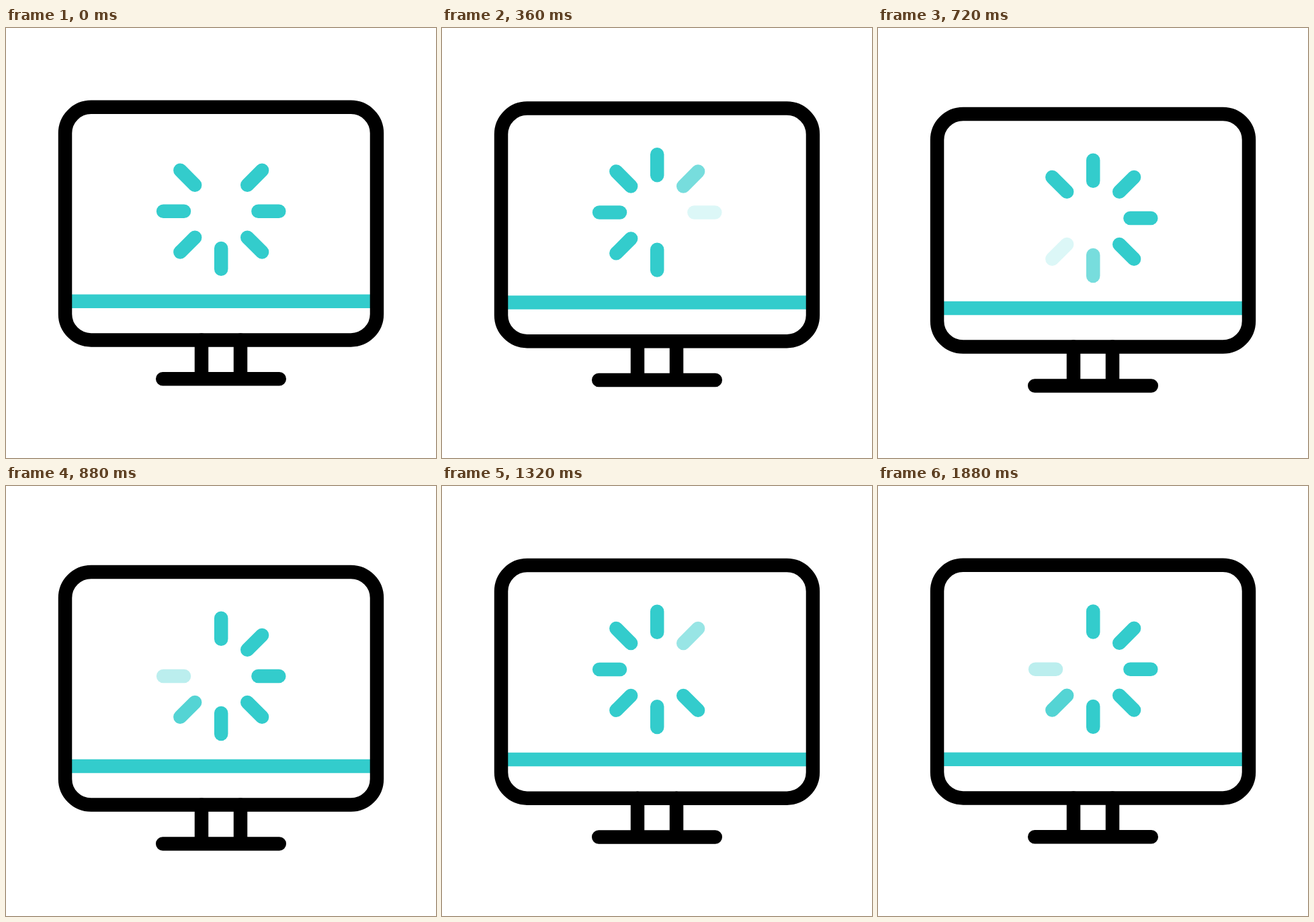
These frames come from a looping animation (640x640 px, 1.92 s). An HTML page:

```html
<!DOCTYPE html>
<html lang="en">
<head>
<meta charset="utf-8">
<title>Loading monitor</title>
<style>
  html, body { margin: 0; width: 100%; height: 100%; overflow: hidden; background: #fff; }
  svg { display: block; width: 100%; height: 100%; fill: none; stroke-width: 20.5; stroke-linecap: round; }
</style>
</head>
<body>
<svg viewBox="0 0 640 640">
  <g id="monitor">
    <path d="M98 406.8H542" stroke="#3cc" stroke-linecap="butt"/>
    <g stroke="#000">
      <rect x="88" y="117.8" width="464" height="346.6" rx="38.7"/>
      <path d="M291 464.4V522.2M349 464.4V522.2M233.2 522.2H406.8"/>
    </g>
    <g id="spinner" stroke="#3cc" transform="translate(320.2 272.7)"></g>
  </g>
</svg>
<script>
const LOOP = 1920, STEP = 40, BARS = 8, DROP = 10.2;
const monitor = document.getElementById('monitor');
const spinner = document.getElementById('spinner');

const bars = Array.from({ length: BARS }, (_, i) => {
  const bar = document.createElementNS('http://www.w3.org/2000/svg', 'path');
  bar.setAttribute('d', 'M0 -86.1V-55.2');
  bar.setAttribute('transform', `rotate(${i * 360 / BARS})`);
  return spinner.appendChild(bar);
});

const clamp = x => Math.min(1, Math.max(0, x));
const ease = (t, from, to) => (1 - Math.cos(Math.PI * clamp((t - from) / (to - from)))) / 2;

// Each bar vanishes at once, then fades back in; this happens twice per loop.
function opacity(i, t) {
  const first = i * 120;
  const second = i ? first + 1000 : 960;
  const age = t - (t >= second ? second : first);
  return age < 0 ? 1 : clamp((age - 80) / 240);
}

function draw(now) {
  const t = Math.floor(now % LOOP / STEP) * STEP;
  const y = DROP * (ease(t, 240, 680) - ease(t, 928, 1364));
  monitor.setAttribute('transform', `translate(0 ${y})`);
  bars.forEach((bar, i) => bar.setAttribute('opacity', opacity(i, t)));
}

const start = performance.now();
function tick() {
  draw(performance.now() - start);
  requestAnimationFrame(tick);
}
tick();
</script>
</body>
</html>
```
